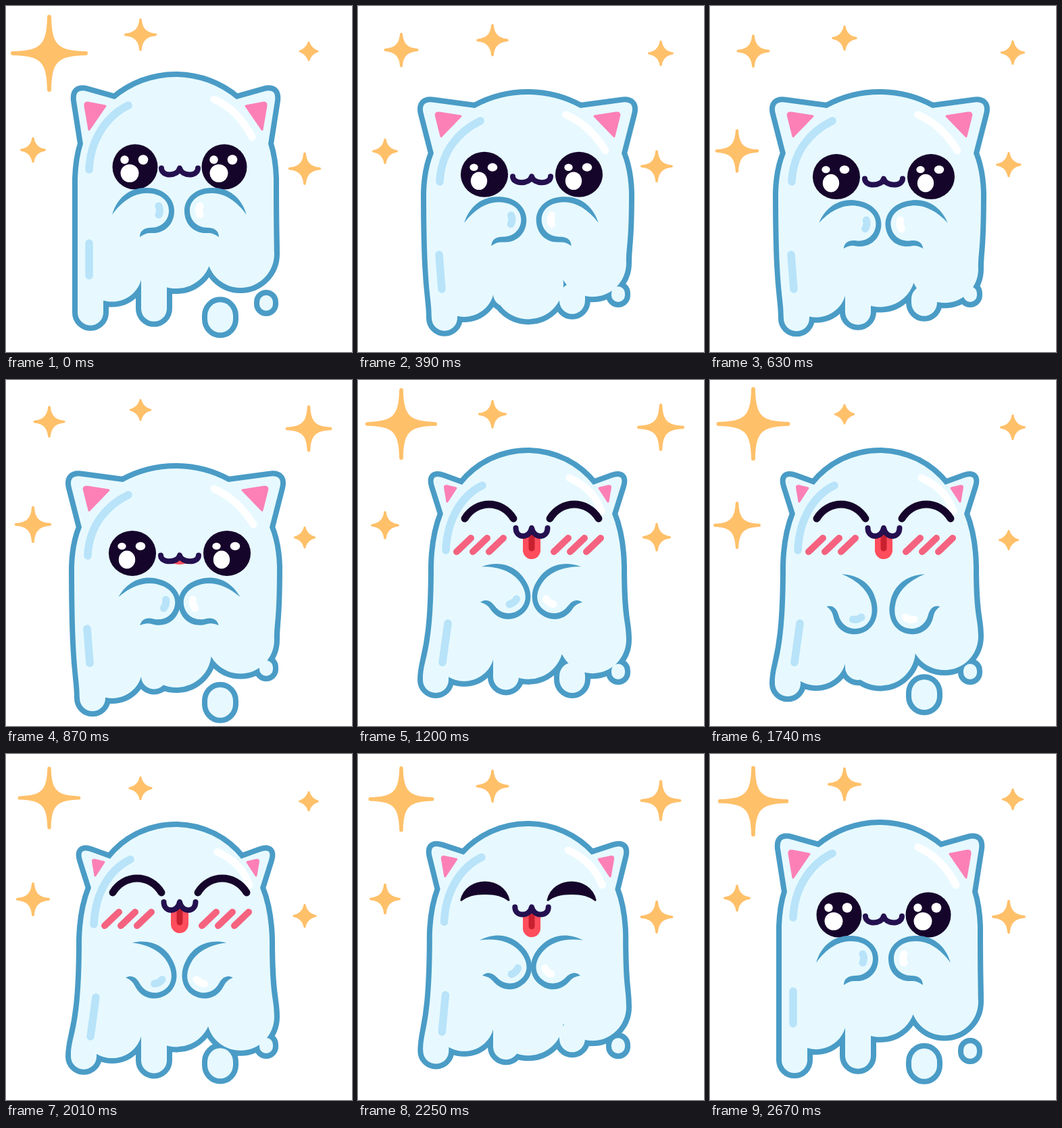
Recreate the animation shown at these times as an HTML page. Size 512 by 512 pixels, loop 2.7 s.

```html
<!DOCTYPE html>
<html lang="en">
<head>
<meta charset="utf-8">
<title>Happy ghost cat</title>
<style>
html, body { margin: 0; width: 100%; height: 100%; overflow: hidden; background: #fff; }
svg { display: block; width: 100vw; height: 100vh; }
.line { fill: none; stroke-linecap: round; stroke-linejoin: round; }
</style>
</head>
<body>
<svg viewBox="0 0 512 512">
  <defs>
    <g id="hand">
      <path fill="#e7f9ff" d="M-57 6C-44-20-26-30-5-30C16-30 31-16 31 0C31 17 18 29 1 29L-14 37Z"/>
      <path fill="#4a9cc6" d="M-57 6C-49-22-28-35-5-34C18-34 35-19 35 0C35 20 21 34 1 33C-6 33-9 34-16 39C-16 30-10 25 1 25C16 25 27 14 27 0C27-15 15-26-6-26C-24-26-42-15-57 6Z"/>
      <path class="line" stroke="currentColor" stroke-width="11" d="M12-7Q15-1 12 6"/>
    </g>
    <g id="open">
      <ellipse id="ball" fill="#16052b"/>
      <g id="shine" fill="#fff"></g>
    </g>
    <path id="shut" class="line" stroke="#16052b" stroke-width="11" d="M-36-13C-19-41 19-41 36-13"/>
    <path id="half" fill="#16052b" stroke="#16052b" stroke-width="3" stroke-linejoin="round" d="M-40-9C-32-44 22-44 30-9C15-22-25-22-40-9Z"/>
    <path id="cheek" class="line" stroke="#f5627f" stroke-width="10" d="M146 254l21-20m3 20l21-20m3 20l21-20"/>
  </defs>
  <path id="stars" fill="#ffc06a"/>
  <path id="edge" fill="#4a9cc6" stroke="#4a9cc6" stroke-width="16" stroke-linejoin="round"/>
  <path id="body" fill="#e7f9ff"/>
  <path id="gloss" class="line" stroke="#b8e3f9" stroke-width="11.5"/>
  <path id="glow" class="line" stroke="#fff" stroke-width="11"/>
  <path id="ears" fill="#fc80b6" stroke="#fc80b6" stroke-width="3" stroke-linejoin="round"/>
  <g id="blush"><use href="#cheek"/><use href="#cheek" x="144"/></g>
  <use id="eyeL"/><use id="eyeR"/>
  <g id="mouth">
    <path id="tongue" fill="#ff4d5c"/>
    <path id="groove" class="line" stroke="#c8202f" stroke-width="9"/>
    <path id="lips" class="line" stroke="#24104f" stroke-width="8"/>
  </g>
  <use id="handL" href="#hand" color="#b8e3f9"/>
  <g transform="translate(513) scale(-1 1)"><use id="handR" href="#hand" color="#fff"/></g>
</svg>
<script>
const LOOP = 2700, STEP = 30, MID = 251;
const $ = id => document.getElementById(id);
const set = (id, attrs) => { for (const k in attrs) $(id).setAttribute(k, attrs[k]); };

const wave = (mid, amp, cycles, shift = 0) => t =>
  mid + amp * Math.cos(2 * Math.PI * cycles * (t + shift) / LOOP);
const ramp = (t, from, to) => {
  const k = Math.min(1, Math.max(0, (t - from) / (to - from)));
  return k * k * (3 - 2 * k);
};

// Moods: squashed while waiting, then happy; the limbs relax later than the head.
const turnHappy = t => ramp(t, 900, 1150);
const squash = t => ramp(t, 0, 390) - turnHappy(t);
const squashed = t => Math.max(0, squash(t));
const joy = t => turnHappy(t) - ramp(t, 2080, 2500);
const hug = t => turnHappy(t) - ramp(t, 2200, 2650);

const swing = wave(0, 1, 2, -990);
const beat = wave(0, 1, 3, -50);
const slosh = wave(0, 1, 4, -15);

// Each value is given at rest, squashed and happy.
const rig = (happy, spec) => t => {
  const s = squashed(t), h = happy(t), out = {};
  for (const k in spec) {
    const [rest, low, glad] = spec[k];
    out[k] = rest + s * (low - rest) + h * (glad - rest);
  }
  return out;
};

// x values of head and ears are distances from the middle line
const head = rig(joy, {
  top: [105, 131, 108],
  jx: [90, 78, 97], jy: [138, 151, 155],
  ex: [150, 159, 144], ey: [121, 140, 138],
  nx: [137, 139, 125], ny: [204, 218, 198],
  sx: [145, 150, 139], sy: [255, 276, 275],
  lobe: [420, 443, 442]
});
const melt = rig(hug, {
  leftX: [125, 128, 115], left: [475, 493, 472], hump: [439, 473, 455],
  drip: [460, 467, 466], belly: [436, 462, 451], drop: [465, 484, 476], bead: [459, 446, 451]
});
const pink = rig(joy, {
  ax: [135, 137, 123], ay: [142, 157, 156],
  bx: [104, 99, 106], by: [148, 163, 160],
  cx: [128, 128, 119], cy: [183, 193, 180]
});
const shade = rig(joy, {
  x1: [123, 121, 130], y1: [242, 260, 252], x2: [181, 181, 184], y2: [147, 170, 156],
  x3: [123, 120, 133], y3: [351, 368, 360], x4: [123, 124, 125], y4: [399, 419, 418],
  x5: [308, 308, 313], y5: [138, 161, 145], x6: [364, 366, 360], y6: [194, 214, 194]
});
const face = rig(joy, {
  gap: [66, 70, 63], eye: [238, 253, 218], rx: [33.5, 35, 34], flat: [1, .84, .86],
  mouth: [240, 256, 219], wide: [27, 28, 23.5], deep: [9.5, 9, 12]
});

const stars = [
  { x: 64, y: wave(65, 5, 5, 15), size: wave(40, 17, 11) },
  { x: 199, y: wave(47, -5, 10, -18), size: wave(19.5, 5.5, 7, 36) },
  { x: 448, y: wave(70, -3, 5, 15), size: wave(25, 10.5, 8, -170) },
  { x: 40, y: wave(214, -1, 10), size: wave(27, -8, 7) },
  { x: 442, y: wave(237, 4.5, 1, 270), size: wave(19.5, 5.5, 7, 36) }
];

function starPath(x, y, h) {
  const r = 1 + .035 * h, s = (8 * (3.5 + .17 * h) - h) / 3, p = s / 4, q = s - p, e = h - r;
  const rot = [(a, b) => [a, b], (a, b) => [-b, a], (a, b) => [-a, -b], (a, b) => [b, -a]];
  const quarter = (f, i) => {
    const pt = (a, b) => { const [u, v] = f(a, b); return `${x + u} ${y + v}`; };
    return `${i ? 'L' : 'M'}${pt(r, -e)}C${pt(p, -q)} ${pt(q, -p)} ${pt(e, -r)}A${r} ${r} 0 0 1 ${pt(e, r)}`;
  };
  return rot.map(quarter).join('') + 'Z';
}

function pill(x, top, bottom, r, ry = r) {
  return `M${x - r} ${top + ry}a${r} ${ry} 0 0 1 ${2 * r} 0V${bottom - ry}a${r} ${ry} 0 0 1 ${-2 * r} 0Z`;
}
const disc = (x, y, r) => pill(x, y - r, y + r, r);

function ear(h, side) {
  const toward = (x, y, d) => {
    const k = d / Math.hypot(x - h.ex, y - h.ey);
    return [h.ex + (x - h.ex) * k, h.ey + (y - h.ey) * k];
  };
  const pt = ([x, y]) => `${MID + side * x} ${y}`;
  const inner = pt(toward(h.jx, h.jy, 20)), outer = pt(toward(h.nx, h.ny, 20));
  const tip = pt([h.ex, h.ey]), notch = pt([h.nx, h.ny]), join = pt([h.jx, h.jy]);
  const bend = pt([h.sx - 1, h.ny + .42 * (h.sy - h.ny)]), shoulder = pt([h.sx, h.sy]);
  return side > 0
    ? `L${inner}Q${tip} ${outer}L${notch}Q${bend} ${shoulder}`
    : `Q${bend} ${notch}L${outer}Q${tip} ${inner}L${join}`;
}

function bodyPath(t) {
  const h = head(t), m = melt(t), b = beat(t), w = slosh(t);
  const sag = h.jy - h.top, R = (h.jx ** 2 + sag ** 2) / (2 * sag);
  const lobe = h.lobe + 5 * w - 58, hump = m.hump + 7 * b - 53, foot = m.left + 6 * b - 27;
  const belly = m.belly - 10 * w - 60, drip = m.drip + 15 * w - 8;
  const drop = m.drop + 28 * b - 8, bead = m.bead - 8;
  const xr = MID + h.sx, xl = MID - h.sx, l = m.leftX - 19, r = m.leftX + 19;
  return `M${MID - h.jx} ${h.jy}A${R} ${R} 0 0 1 ${MID + h.jx} ${h.jy}` + ear(h, 1)
    + `C${xr} ${lobe - 25} 397 ${lobe - 30} 397 ${lobe}L300 ${lobe + 8}L200 ${hump}H${r}V${foot}`
    + `A19 19 0 0 1 ${l} ${foot}C${l} ${foot - 35} ${xl} ${foot - 35} ${xl} ${h.sy}`
    + ear(h, -1) + 'Z'
    + disc(157, hump, 45) + disc(252, belly, 52) + disc(347, lobe, 50)
    + pill(219, hump - 30, drip, 19)
    + pill(317, drop - 45, drop, 19, 20) + pill(385, bead - 23, bead, 10);
}

function drawEars(t) {
  const p = pink(t), mix = (a, b, k) => a + (b - a) * k;
  const triangle = s => {
    const x = v => MID + s * v;
    const start = `${x(mix(p.ax, p.bx, .2))} ${mix(p.ay, p.by, .2)}`;
    return `M${start}L${x(p.bx)} ${p.by}L${x(p.cx)} ${p.cy}`
      + `L${x(mix(p.ax, p.cx, .15))} ${mix(p.ay, p.cy, .15)}Q${x(p.ax)} ${p.ay} ${start}Z`;
  };
  set('ears', { d: triangle(-1) + triangle(1) });
}

function drawFace(t) {
  const f = face(t), low = squashed(t), bob = 4 * low * swing(t);
  const shut = t >= 1080 && t < 2190, half = t >= 1020 && t < 2340;
  const href = shut ? '#shut' : half ? '#half' : '#open';
  set('eyeL', { href, x: 257 - f.gap, y: f.eye + bob });
  set('eyeR', { href, x: 257 + f.gap, y: f.eye + bob });
  set('ball', { rx: f.rx, ry: 33.5 });
  const dot = (x, y, rx, ry) => `<ellipse cx="${x}" cy="${y}" rx="${rx}" ry="${ry}"/>`;
  $('shine').innerHTML = dot(-15.5, -10.5, 6.2, 6.2 * f.flat)
    + dot(12, -10.5, 7.3, 7.3 * f.flat) + dot(-8, 9.5, 13.5 * (.4 + .6 * f.flat), 13.3);
  set('blush', { visibility: t >= 1110 && t < 2160 ? 'visible' : 'hidden' });

  const w = f.wide, d = f.deep, c = d * 1.33;
  const n = 46 * hug(t) + 16 * low * Math.max(0, swing(t)), ry = Math.min(13, n - d);
  set('mouth', { transform: `translate(257 ${f.mouth + bob})` });
  set('lips', { d: `M${-w} 0C${-w} ${c} -3 ${c} 0 0C3 ${c} ${w} ${c} ${w} 0` });
  set('tongue', { d: ry > 0 ? `M-13 ${d}Q-4 ${d} 0 3Q4 ${d} 13 ${d}V${n - ry}A13 ${ry} 0 0 1 -13 ${n - ry}Z` : '' });
  set('groove', { d: n > 28 ? `M0 10V${n - 16}` : '' });
}

function drawHands(t) {
  const s = squashed(t), h = hug(t), w = swing(t), kick = w * (7 * s - 15 * h);
  const x = 214 + 5 * (1 + w) * (s + h), y = 303 + 20 * s + 24 * h + kick;
  const transform = `translate(${x} ${y}) rotate(${8 * s + 62 * h + kick})`;
  set('handL', { transform });
  set('handR', { transform });
}

function draw(t) {
  set('stars', { d: stars.map(s => starPath(s.x, s.y(t), s.size(t))).join('') });
  const d = bodyPath(t), g = shade(t);
  set('edge', { d });
  set('body', { d });
  set('gloss', { d: `M${g.x1} ${g.y1}C${g.x1 + 2} ${g.y1 - 46} ${g.x2 - 31} ${g.y2 + 15} ${g.x2} ${g.y2}M${g.x3} ${g.y3}L${g.x4} ${g.y4}` });
  set('glow', { d: `M${g.x5} ${g.y5}Q${g.x5 + 36} ${g.y5 + 16} ${g.x6} ${g.y6}` });
  drawEars(t);
  drawFace(t);
  drawHands(t);
}

const start = performance.now();
function tick() {
  const t = (performance.now() - start) % LOOP;
  draw(Math.floor(t / STEP) * STEP);
  requestAnimationFrame(tick);
}
tick();
</script>
</body>
</html>
```
